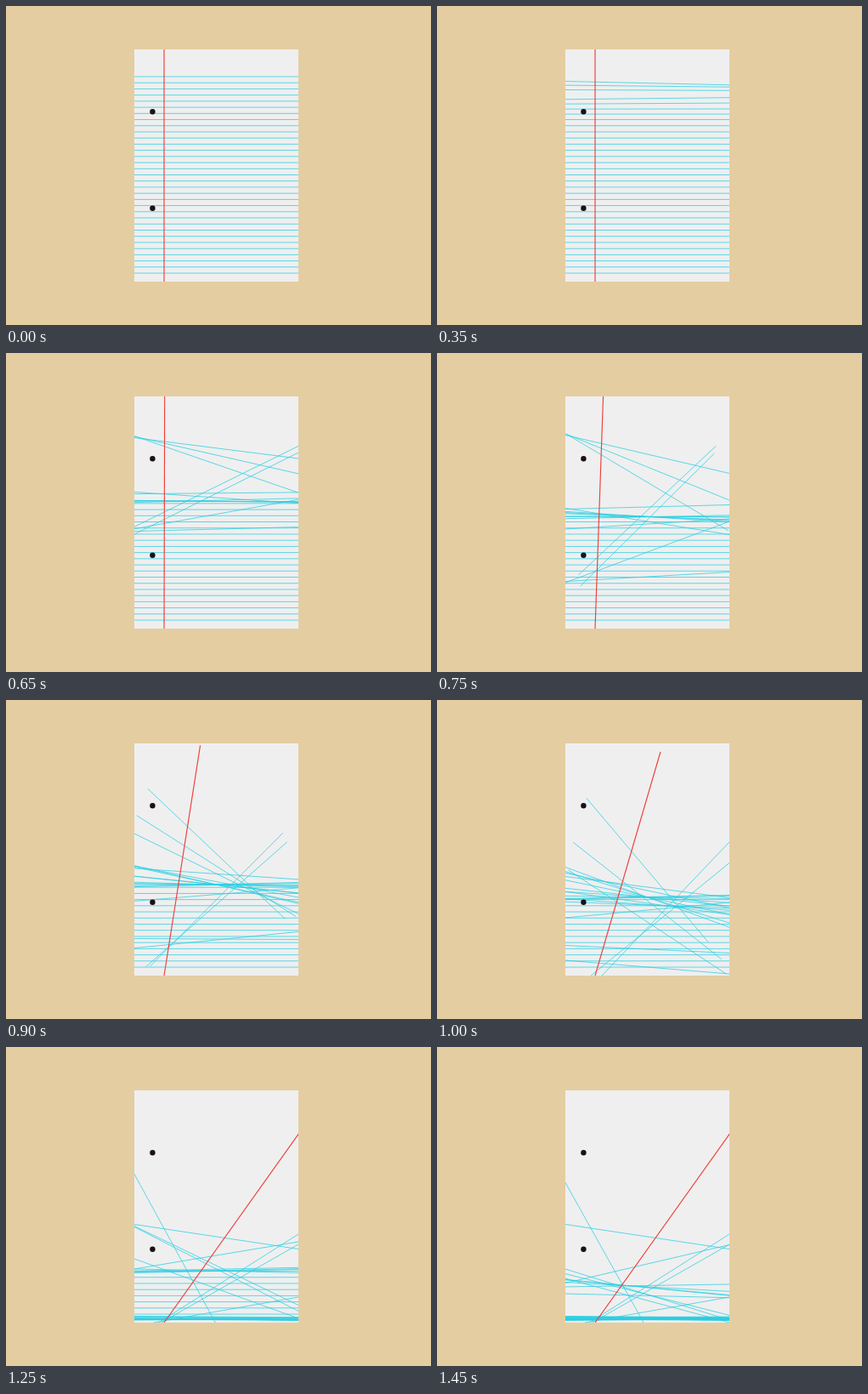
An HTML page with a canvas for the animation above (1650 ms loop, 500x375 px).

```html
<!DOCTYPE html>
<html lang="en">
<head>
<meta charset="utf-8">
<title>Falling lines</title>
<style>
  html, body { margin: 0; width: 100%; height: 100%; overflow: hidden; background: #e5cda2; }
  canvas { display: block; }
</style>
</head>
<body>
<canvas id="stage" width="500" height="375"></canvas>
<script>
const ctx = document.getElementById('stage').getContext('2d');
const LOOP = 1650, STEP = 50, HOLD = 200, LAST = 1450;
const page = { x: 151, y: 51, w: 193, h: 273 };
const FLOOR = page.y + page.h, MID = page.x + page.w / 2;
const COUNT = 33, HALF = 111;

const restY = i => 83 + 7.22 * i;
const lerp = (a, b, k) => a + (b - a) * k;
const clamp01 = v => Math.min(1, Math.max(0, v));
const progress = (t, from, to) => clamp01((t - from) / (to - from));
const random = seed => {
  const v = Math.sin(seed * 127.1 + 3.7) * 43758.5453;
  return v - Math.floor(v);
};

// The top lines swing freely: height and tilt at three moments, then a last slump.
const rod = (mid, tilt, slump = 0) => ({ mid, tilt, slump });
const rods = [
  rod([152, 200, 326], [115, 228, 353], 6),
  rod([134, 236, 261], [78, 152, 99], 30),
  rod([119, 261, 284], [45, 127, 70], 14),
  rod([185, 268, 281], [-181, -202, -122]),
  rod([196, 270, 287], [-191, -157, -110]),
  rod([234, 314, 320], [-72, 16, 2]),
  rod([263, 293, 311], [-11, 9, -34]),
  rod([198, 224, 223], [31, 41, 29]),
  rod([201, 247, 245], [-12, -18, -32], 10),
  rod([181, 220, 257], [-5, 25, 93], 34)
];

function rodPose(i, t) {
  const { mid, tilt, slump } = rods[i];
  const u = progress(t, 150 + 28 * i, 750);
  if (u < 1) return { mid: lerp(restY(i), mid[0], u * u), tilt: tilt[0] * u ** 3 };
  const k = t < 1000 ? 0 : 1;
  const v = progress(t, 750 + 250 * k, 1000 + 250 * k);
  const s = slump * progress(t, 1250, LAST);
  return { mid: lerp(mid[k], mid[k + 1], v) + s, tilt: lerp(tilt[k], tilt[k + 1], v) - 1.3 * s };
}

// A slowing front sweeps down the page and loosens the lines it meets.
const FRONT = { time: 550, y: 155, speed: 0.2, drag: 6.5e-5 };

function frontY(t) {
  const d = t - FRONT.time;
  return FRONT.y + FRONT.speed * d - FRONT.drag * d * d;
}

function looseAt(i) {
  const { time, y, speed, drag } = FRONT;
  const root = Math.sqrt(Math.max(0, speed * speed - 4 * drag * (restY(i) - y)));
  return Math.min(time + (speed - root) / (2 * drag), 1250 + 25 * (i - 25));
}

// Every fourth loose line rides on the front, the others drop to the floor.
function loosePose(i, t) {
  const y = restY(i), start = looseAt(i), r = random(i);
  if (t <= start) return { mid: y, tilt: 0 };
  if (i % 4 === 1) {
    const slump = progress(t, 1250, LAST);
    return { mid: Math.max(y, frontY(t) + 3 * r - 2), tilt: -4 + 28 * r * slump };
  }
  const u = progress(t, start, start < 1150 ? 1250 : LAST);
  const fall = lerp(y, 317 + 4 * random(i + 50), u ** (1.2 + r));
  return {
    mid: u < 1 ? Math.max(fall, frontY(t)) : fall,
    tilt: 80 * r * Math.sin(Math.PI * u * u) + (random(i + 90) - 0.5) * 4 * u
  };
}

function stroke(x1, y1, x2, y2, color, width) {
  ctx.strokeStyle = color;
  ctx.lineWidth = width;
  ctx.beginPath();
  ctx.moveTo(x1, y1);
  ctx.lineTo(x2, y2);
  ctx.stroke();
}

// A line whose low end meets the floor slides along itself.
function rule({ mid, tilt }) {
  const slope = tilt / page.w;
  const dx = HALF / Math.hypot(1, slope);
  const sunk = mid + Math.abs(slope) * dx - FLOOR;
  const centre = sunk > 0 && slope ? MID - sunk / slope : MID;
  const yAt = x => mid + slope * (x - MID);
  stroke(centre - dx, yAt(centre - dx), centre + dx, yAt(centre + dx), 'rgba(40, 206, 226, 0.75)', 1);
}

// The margin tips over its foot until it leans on the right edge.
function margin(t) {
  const fall = Math.max(0, (t - 615) / 385);
  const angle = Math.min(35.5, 16.3 * fall * fall) * Math.PI / 180;
  const x = 186, length = 274;
  stroke(x, FLOOR, x + length * Math.sin(angle), FLOOR - length * Math.cos(angle), '#ee3f3b', 1.15);
}

function hole(y) {
  ctx.fillStyle = '#1a1014';
  ctx.beginPath();
  ctx.arc(172.4, y, 3.2, 0, Math.PI * 2);
  ctx.fill();
}

function draw(t) {
  ctx.fillStyle = '#e5cda2';
  ctx.fillRect(0, 0, 500, 375);
  ctx.save();
  ctx.beginPath();
  ctx.rect(page.x, page.y, page.w, page.h);
  ctx.clip();
  ctx.fillStyle = '#efefef';
  ctx.fillRect(page.x, page.y, page.w, page.h);
  for (let i = 0; i < COUNT; i++) rule(i < rods.length ? rodPose(i, t) : loosePose(i, t));
  margin(t);
  hole(124.3);
  hole(237.8);
  ctx.restore();
}

const origin = performance.now();
function frame() {
  const t = (performance.now() - origin) % LOOP;
  draw(t < HOLD ? 0 : Math.min(LAST, Math.floor(t / STEP) * STEP));
  requestAnimationFrame(frame);
}
frame();
</script>
</body>
</html>
```
